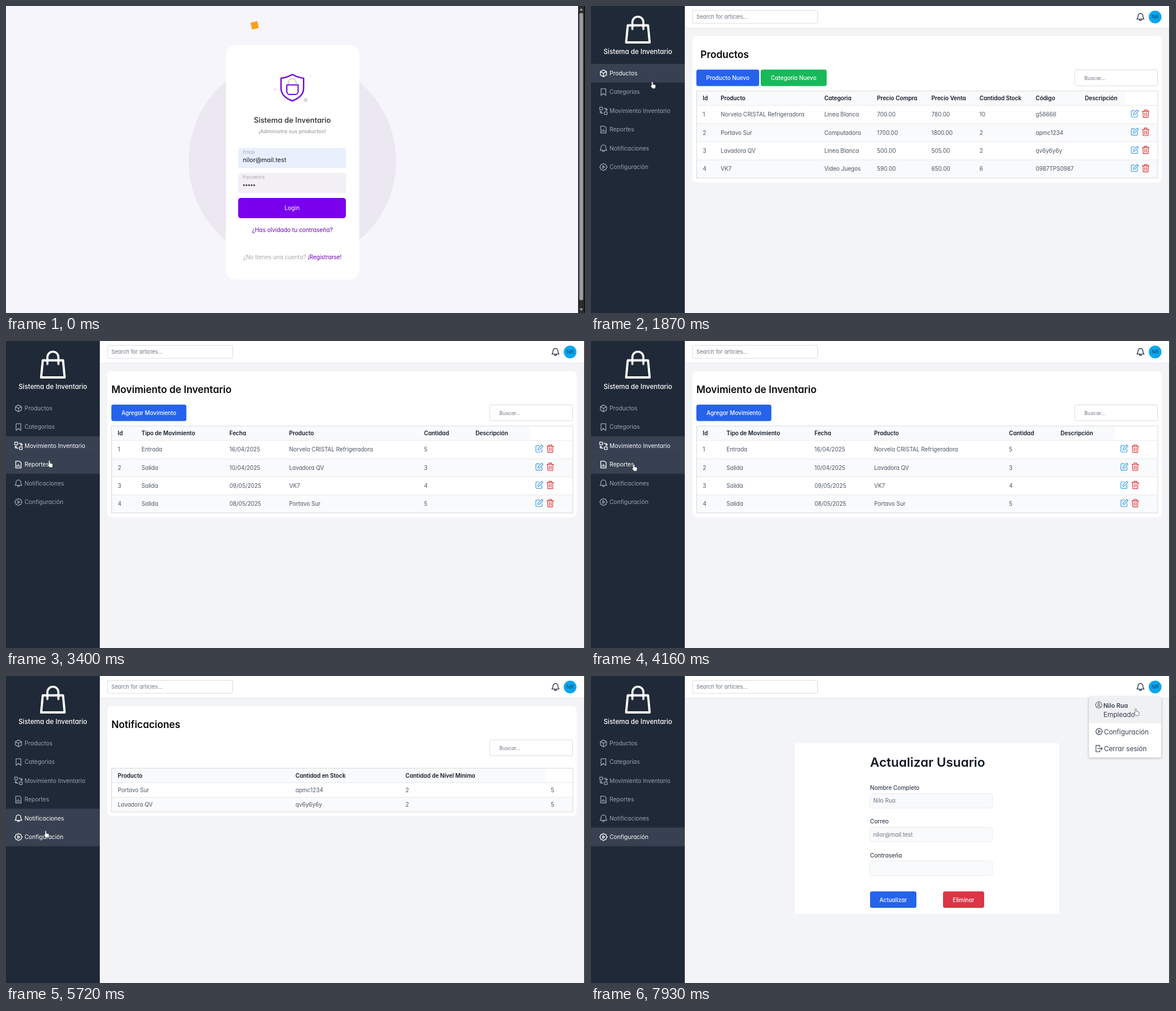
Recreate the animation shown at these times as an HTML page. Size 1000 by 531 pixels, loop 7990 ms.

```html
<!DOCTYPE html>
<html lang="es">
<head>
<meta charset="utf-8">
<title>Sistema de Inventario</title>
<style>
  html, body { margin: 0; width: 100%; height: 100%; overflow: hidden; background: #f3f4f6; }
  svg { display: block; width: 100%; height: 100%; }
  /* cv11: single-storey a */
  text { font-family: Inter, Roboto, sans-serif; font-feature-settings: "cv11"; white-space: pre; }
  .line { fill: none; stroke-linecap: round; stroke-linejoin: round; }
</style>
</head>
<body>
<svg id="stage" viewBox="0 0 1000 531"></svg>
<script>
const LOOP = 7990;
const USER = 'Nilo Rua', MAIL = 'nilor@mail.test';
const INK = '#111827', BODY = '#4b5563', SLATE = '#374151', MUTED = '#9ca3af';
const BLUE = '#2563eb', GREEN = '#18b95b', RED = '#dc3545';

// Drawing helpers
const rect = (x, y, w, h, fill, r = 0, stroke = 'none') =>
  `<rect x="${x}" y="${y}" width="${w}" height="${h}" rx="${r}" fill="${fill}" stroke="${stroke}" stroke-width=".8"/>`;
const circle = (x, y, r, fill) => `<circle cx="${x}" cy="${y}" r="${r}" fill="${fill}"/>`;
const text = (x, y, size, fill, label, weight = 400, anchor = 'start') =>
  `<text x="${x}" y="${y}" font-size="${size}" fill="${fill}" font-weight="${weight}" text-anchor="${anchor}">${label}</text>`;
const line = (d, color, width) => `<path class="line" d="${d}" stroke="${color}" stroke-width="${width}"/>`;
const group = (id, content) => `<g id="${id}">${content}</g>`;

const ICONS = {
  cube: 'M12 2L21 7V17L12 22L3 17V7ZM3 7L12 12L21 7M12 12V22',
  bookmark: 'M5 2h14v20l-7-6-7 6z',
  swap: 'M1 1h8v8h-8zM15 15h8v8h-8zM13 5h8v6m-3-3l3 3 3-3M11 19H4v-6m-3 3l3-3 3 3',
  report: 'M4 2h11l5 5v15H4zM8 18v-4M12 18v-7M16 18v-3',
  bell: 'M12 2a7 7 0 0 1 7 7c0 6 2 8 3 9H2c1-1 3-3 3-9a7 7 0 0 1 7-7zM9 19a3 3 0 0 0 6 0',
  gear: 'M12 1l3 3h4l1 4 3 4-3 4-1 4h-4l-3 3-3-3H5l-1-4-3-4 3-4 1-4h4zM10 8l6 4-6 4z',
  edit: 'M12 3H4a2 2 0 0 0-2 2v15a2 2 0 0 0 2 2h14a2 2 0 0 0 2-2v-7M8 16l1-5L19.500 1l3.500 3.500L13 15z',
  trash: 'M2 5h20M8 5V1h8v4M4 5l1 18h14l1-18M9.500 9.500v9M14.500 9.500v9',
  sheet: 'M4 1h11l6 6v16H4zM14 1v7h7M8 12h9v7H8zM8 15.500h9M12 12v7',
  file: 'M3 12V1h12l6 6v5M14 1v7h7',
  user: 'M12 1a11 11 0 1 0 .1 0zM12 6a3.500 3.500 0 1 0 .1 0zM5 20c2-6 12-6 14 0',
  exit: 'M15 7V2H3v20h12v-5M9 12h14m-4-4l4 4-4 4'
};
const icon = (name, cx, cy, size, color, width = 2) =>
  `<g transform="translate(${cx - size / 2} ${cy - size / 2}) scale(${size / 24})">${line(ICONS[name], color, width)}</g>`;

const button = (x, y, w, fill, label) =>
  rect(x, y, w, 28.5, fill, 3.5) + text(x + w / 2, y + 18, 9.7, '#fff', label, 500, 'middle');
const search = rect(835.5, 110.5, 143, 27.5, '#fff', 2.5, '#d1d5db') + text(852, 127.5, 8.8, '#6b7280', 'Buscar...');
const card = (bottom, title, x = 182) => rect(175, 52, 810.5, bottom - 52, '#fff', 7) + text(x, 90, 16.9, '#0a0a0a', title, 600);

function table({ top, rowHeight, columns, heads, rows, blankFrom, actionsAt }) {
  const headBottom = top + 25, height = 25 + rowHeight * rows.length;
  let out = rect(182.5, top, 796.5, 25, '#f9fafb') + rect(blankFrom, top, 979 - blankFrom, 25, '#fff');
  out += heads.map((head, i) => text(columns[i], top + 16.2, 9.7, INK, head, 600)).join('');
  rows.forEach((row, r) => {
    const y = headBottom + r * rowHeight, middle = y + rowHeight / 2;
    if (r % 2) out += rect(182.5, y, 796.5, rowHeight, '#f9fafb');
    out += line(`M182.500 ${y}H979`, '#e2e4e8', .8);
    out += row.map((cell, i) => text(columns[i], middle + 3.5, 9.7, BODY, cell)).join('');
    if (actionsAt) out += icon('edit', actionsAt, middle - 1.5, 14, '#4299ea') +
      `<g class="trash">${icon('trash', actionsAt + 19, middle - 1.5, 14, 'currentColor')}</g>`;
  });
  return out + rect(182.5, top, 796.5, height, 'none', 0, '#cfd2d7');
}

const FRIDGE = 'Norvela CRISTAL Refrigeradora', LAPTOP = 'Portavo Sur', WASHER = 'Lavadora QV', CONSOLE = 'VK7';
const STOCK = [
  [FRIDGE, 'Linea Blanca', '700.00', '780.00', '10', 'g56666'],
  [LAPTOP, 'Computadora', '1700.00', '1800.00', '2', 'apmc1234'],
  [WASHER, 'Linea Blanca', '500.00', '505.00', '2', 'qv6y6y6y'],
  [CONSOLE, 'Video Juegos', '590.00', '650.00', '6', '0987TPS0987']
];
const numbered = rows => rows.map((row, i) => [i + 1, ...row]);
const levels = STOCK.map(([name, , , , count, code]) => [name, code, count, '5']);

const pages = [
  card(305, 'Productos', 189) + button(182, 110, 108.5, BLUE, 'Producto Nuevo') +
    button(293, 110, 114, GREEN, 'Categoría Nuevo') + search +
    table({ top: 147, rowHeight: 31.4, blankFrom: 923, actionsAt: 939,
      columns: [193, 224, 403, 494, 588, 671, 768, 853],
      heads: ['Id', 'Producto', 'Categoria', 'Precio Compra', 'Precio Venta', 'Cantidad Stock', 'Código', 'Descripción'],
      rows: numbered(STOCK) }),

  card(273, 'Categorias') + button(182, 110, 114, BLUE, 'Categoría Nuevo') + search +
    table({ top: 147, rowHeight: 31.4, blankFrom: 905, actionsAt: 921,
      columns: [193, 234, 560], heads: ['Id', 'Categoria', 'Descripción'],
      rows: numbered([['Linea Blanca'], ['Computadora'], ['Video Juegos']]) }),

  card(305, 'Movimiento de Inventario') + button(182, 110, 129.5, BLUE, 'Agregar Movimiento') + search +
    table({ top: 147, rowHeight: 31.4, blankFrom: 905, actionsAt: 921,
      columns: [193, 234, 386, 489, 722, 811],
      heads: ['Id', 'Tipo de Movimiento', 'Fecha', 'Producto', 'Cantidad', 'Descripción'],
      rows: numbered([
        ['Entrada', '16/04/2025', FRIDGE, 5], ['Salida', '10/04/2025', WASHER, 3],
        ['Salida', '09/05/2025', CONSOLE, 4], ['Salida', '08/05/2025', LAPTOP, 5]]) }),

  card(293, 'Reporte de Productos') + icon('sheet', 209.5, 128, 19, SLATE, 2.2) + icon('file', 267, 128, 18, SLATE, 2.2) +
    text(267.5, 138, 8, SLATE, 'PDF', 800, 'middle') + search +
    table({ top: 159.5, rowHeight: 25.3, blankFrom: 933, columns: [193, 500, 690, 941],
      heads: ['Producto', 'Cantidad en Stock', 'Cantidad de Nivel Mínimo'], rows: levels }),

  card(242, 'Notificaciones') + search +
    table({ top: 159.5, rowHeight: 25.3, blankFrom: 933, columns: [193, 500, 690, 941],
      heads: ['Producto', 'Cantidad en Stock', 'Cantidad de Nivel Mínimo'],
      rows: levels.filter(row => +row[2] < 5) }),

  rect(352, 116.5, 456.5, 295, '#fff') + text(482, 157, 22, INK, 'Actualizar Usuario', 600) +
    [['Nombre Completo', USER], ['Correo', MAIL], ['Contraseña', '']].map(([label, value], i) => {
      const y = 197 + i * 58.3;
      return text(482, y, 9.8, SLATE, label, 500) + rect(481.5, y + 6.5, 212, 25, '#f9fafb', 4, '#e5e7eb') +
        text(487.5, y + 22.3, 9.7, '#6b7280', value);
    }).join('') + button(482, 372.5, 80, BLUE, 'Actualizar') + button(608, 372.5, 71, RED, 'Eliminar')
];

const ROW = 32.4, MENU_TOP = 100;
const menu = [['cube', 'Productos'], ['bookmark', 'Categorias'], ['swap', 'Movimiento Inventario'],
  ['report', 'Reportes'], ['bell', 'Notificaciones'], ['gear', 'Configuración']].map(([name, label], i) => {
    const y = MENU_TOP + ROW * (i + .5);
    return `<g class="item" color="${MUTED}">${rect(0, y - ROW / 2, 162, ROW, 'transparent')}` +
      icon(name, 21.5, y + .3, 14, 'currentColor', 2.2) + text(32, y + 3.7, 10, 'currentColor', label) + '</g>';
  }).join('');

const frame = rect(0, 0, 1000, 531, '#f3f4f6') + rect(162, 0, 838, 38, '#fff') + line('M162 38.500H999', '#e3e5e9', 1) +
  rect(175.5, 7.5, 216, 22.5, '#fff', 2.5, '#d1d5db') + text(182, 22, 9.2, '#6b7280', 'Search for articles...') +
  icon('bell', 949, 19, 14.5, SLATE, 2.4) + circle(974.3, 19, 11, '#06a6ef') + text(974.3, 22.3, 9.2, '#17496b', 'NR', 400, 'middle') +
  rect(0, 0, 162, 531, '#1f2937') + line('M63.500 33.500H98.500L101.300 63H60.700Z', '#fff', 3.8) +
  line('M71.500 40V28a9.500 9.500 0 0 1 19 0V40', '#fff', 3.6) +
  text(81, 82.5, 11.4, '#fff', 'Sistema de Inventario', 500, 'middle') + menu;

const dropdown = `<g style="filter:drop-shadow(0 1px 2px #0004)">${rect(860, 36, 125, 105, '#fff', 2)}</g>` +
  rect(860, 36, 125, 45.5, '#f0f1f3') + icon('user', 877, 50, 12, SLATE) + text(885, 54.5, 10.5, SLATE, USER, 600) +
  text(885, 71, 11.5, SLATE, 'Empleado') + icon('gear', 877.5, 96, 13, SLATE) + text(886, 100.5, 11.5, SLATE, 'Configuración') +
  icon('exit', 877, 125.5, 13, SLATE) + text(886, 130, 11.5, SLATE, 'Cerrar sesión');

const PURPLE = '#7a00ee', LINK = '#6b00b3';
const login = rect(0, 0, 1000, 531, '#f7f5fc') + circle(494.5, 268, 179.3, '#ece8f2') + rect(380, 68, 230, 405, '#fff', 16) +
  `<g transform="rotate(-13 429.5 33.5)">${rect(423.5, 27.5, 12, 12, '#faa019')}</g>` +
  line('M488 136v-4a6.500 6.500 0 0 1 13 0v4', '#d5d2dc', 2) + rect(485, 136, 19.5, 17, '#fff') +
  line('M485 136.500H504.500V148a5 5 0 0 1-5 5H490a5 5 0 0 1-5-5Z', '#7206dc', 2) +
  line('M494.500 118.500Q503 123.500 514 125V142Q514 157 494.500 164Q475 157 475 142V125Q486 123.500 494.500 118.500Z', '#7206dc', 2.4) +
  circle(464.5, 144.5, 2, '#e0dce8') + circle(517.5, 162.7, 3.6, '#dcd8e4') + circle(525.5, 121, 1.3, '#e6e3ec') +
  text(494.5, 202, 12.8, '#29252f', 'Sistema de Inventario', 500, 'middle') +
  text(494.5, 220, 9.1, '#a09da7', '¡Administre sus productos!', 500, 'middle') +
  rect(401, 245.5, 186.5, 35, '#e8f0fe', 4.5) + text(409, 256, 8, '#a9a9b4', 'Email') + text(409, 270, 10.7, '#17171c', MAIL) +
  rect(401, 288.8, 186.5, 35, '#f2f0f5', 4.5) + text(409, 299, 8, '#a9a9b4', 'Password') +
  [0, 1, 2, 3, 4].map(i => circle(411 + i * 4.4, 310, 1.4, '#222')).join('') +
  rect(401, 332, 186, 35, PURPLE, 4.5) + text(494, 353, 10, '#fff', 'Login', 400, 'middle') +
  text(494.5, 391, 9.9, LINK, '¿Has olvidado tu contraseña?', 400, 'middle') +
  text(494.5, 437.5, 9.8, '#aaa7b0', `¿No tienes una cuenta? <tspan fill="${LINK}">¡Registrarse!</tspan>`, 400, 'middle') +
  rect(988, 0, 11, 531, '#2b2b2d') + rect(990.3, 12, 6.5, 497, '#9c9c9e', 3.2) +
  '<path d="M990.500 8l3-4.500 3 4.500zM990.500 523l3 4.500 3-4.500z" fill="#9c9c9e"/>';

const HAND = 'M-1.300 1a1.200 1.200 0 0 1 2.400 0v3.200l3.600.9q1.300.400 1.100 1.800l-.8 4.700h-4.800l-3.300-4.300q.2-1.600 1.800-.4z';
const ARROW = 'M0 0v9l2-1.800 1.400 3 1.300-.6-1.400-2.900h2.800z';

const stage = document.getElementById('stage');
stage.innerHTML = group('app', frame + pages.map(page => `<g class="page">${page}</g>`).join('') + group('dropdown', dropdown)) +
  group('login', login) + rect(998.7, 0, 1.3, 531, '#0c0c0c') +
  '<path id="cursor" fill="#fff" stroke="#3c3f46" stroke-width=".7" stroke-linejoin="round"/>';

// Start time of each page, in menu order
const PAGE_STARTS = [0, 2240, 3000, 4440, 5420, 6260];
const LOGIN_END = 460, CURSOR_START = 1210, DROPDOWN_START = 7210;

// Pointer path: time, x, y
const PATH = [
  [1210, 480, 350], [1500, 360, 250], [1870, 106, 131], [1960, 98, 148], [2300, 92, 150],
  [2640, 82, 182], [3080, 80, 184], [3400, 75, 207], [3560, 74, 212], [4450, 74, 214],
  [4740, 70, 260], [4900, 70, 255], [5120, 70, 250], [5500, 70, 250], [5820, 68, 276],
  [6300, 68, 278], [6560, 846, 24], [6800, 972, 18], [7450, 972, 18], [7750, 971, 20], [7930, 941, 57]
];

function pointerAt(t) {
  const next = PATH.findIndex(point => point[0] > t);
  if (next < 0) return PATH[PATH.length - 1].slice(1);
  if (next === 0) return PATH[0].slice(1);
  const [t0, x0, y0] = PATH[next - 1], [t1, x1, y1] = PATH[next];
  const k = (t - t0) / (t1 - t0);
  return [x0 + (x1 - x0) * k, y0 + (y1 - y0) * k];
}

const show = (el, on) => { el.style.display = on ? '' : 'none'; };
const byId = id => document.getElementById(id);
const items = [...document.querySelectorAll('.item')], pageNodes = [...document.querySelectorAll('.page')];
const trashes = [...document.querySelectorAll('.trash')];
const loginNode = byId('login'), dropdownNode = byId('dropdown'), cursor = byId('cursor');

function render(t) {
  const active = PAGE_STARTS.filter(start => start <= t).length - 1;
  const moving = t >= CURSOR_START;
  const [x, y] = pointerAt(t);
  const inMenu = moving && x < 162;
  const hovered = inMenu ? Math.floor((y - MENU_TOP) / ROW) : -1;

  show(loginNode, t < LOGIN_END);
  show(dropdownNode, t >= DROPDOWN_START);
  pageNodes.forEach((page, i) => show(page, i === active));
  items.forEach((item, i) => {
    const lit = i === active || i === hovered;
    item.setAttribute('color', lit ? '#fff' : MUTED);
    item.firstChild.setAttribute('fill', lit ? SLATE : 'transparent');
  });
  trashes.forEach(node => node.setAttribute('color', moving ? '#df3034' : '#5c2d35'));

  show(cursor, moving);
  cursor.setAttribute('d', inMenu || x > 930 ? HAND : ARROW);
  cursor.setAttribute('transform', `translate(${x} ${y})`);
}

function tick() {
  render(performance.now() % LOOP);
  requestAnimationFrame(tick);
}
tick();
</script>
</body>
</html>
```
